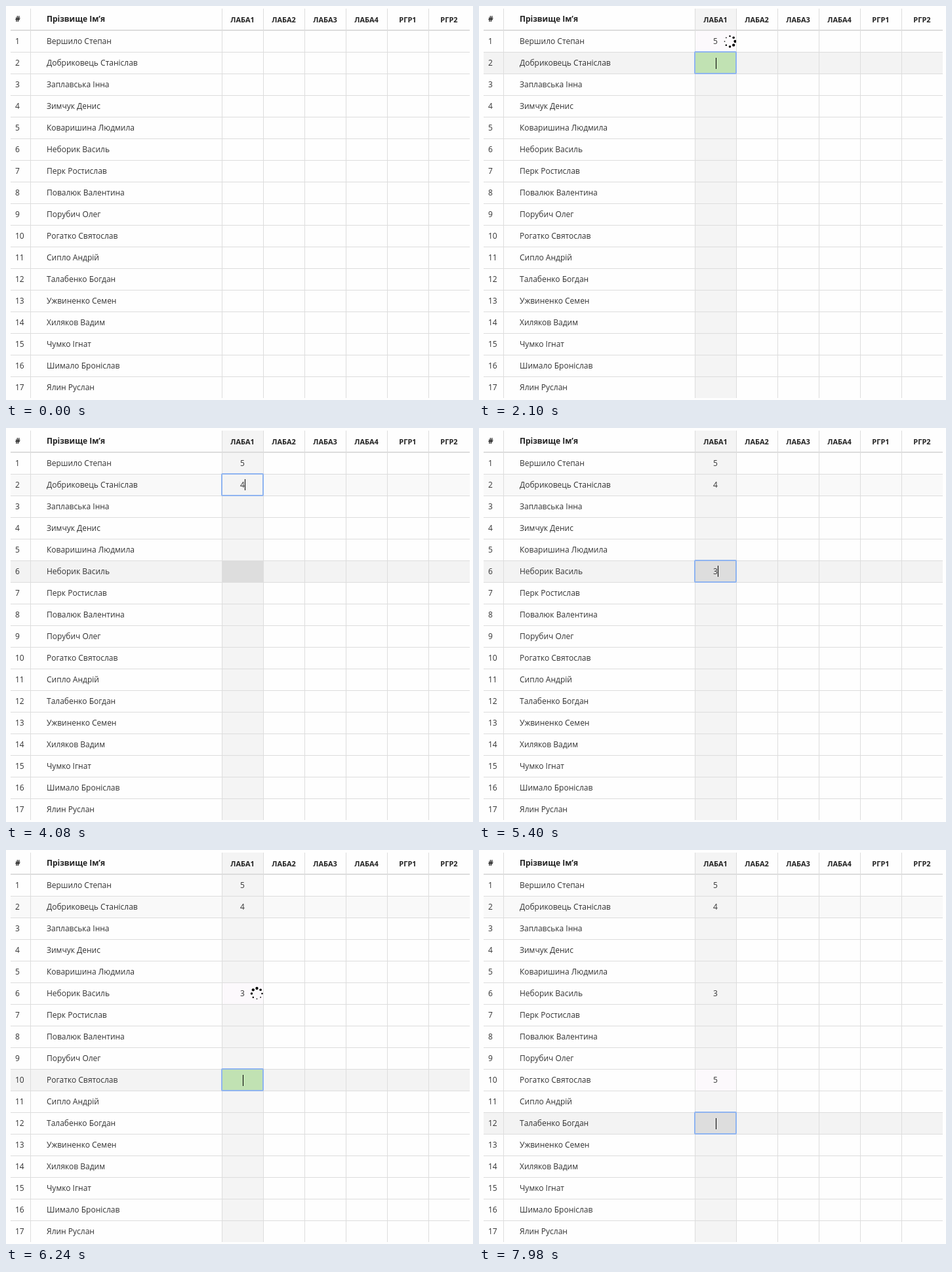
Recreate the animation shown at these times as an HTML page with a canvas. Size 712 by 601 pixels, loop 8000 ms.

```html
<!DOCTYPE html>
<html lang="uk">
<head>
<meta charset="utf-8">
<style>
  html, body { margin: 0; width: 100%; height: 100%; overflow: hidden; background: #fefefe; }
  canvas { display: block; }
</style>
</head>
<body>
<canvas id="stage" width="712" height="601"></canvas>
<script>
const ctx = document.getElementById('stage').getContext('2d');
const LOOP = 8000, TICK = 60, BLINK = 500, ROW_TIME = 125;
const ROW = 33, FIRST = 38, COL = 330, COL_W = 62, MID = 360.5;

const students = [
  'Вершило Степан', 'Добриковець Станіслав', 'Заплавська Інна', 'Зимчук Денис',
  'Коваришина Людмила', 'Неборик Василь', 'Перк Ростислав', 'Повалюк Валентина',
  'Порубич Олег', 'Рогатко Святослав', 'Сипло Андрій', 'Талабенко Богдан',
  'Ужвиненко Семен', 'Хиляков Вадим', 'Чумко Ігнат', 'Шимало Броніслав', 'Ялин Руслан'
];
const works = ['ЛАБА1', 'ЛАБА2', 'ЛАБА3', 'ЛАБА4', 'РГР1', 'РГР2'];

// Each visit: the pointer moves to a row, clicks its cell, then a mark is typed.
// A click also saves the previous mark; busy is how long that takes.
const visits = [
  { row: 1, move: 240, click: 540, busy: 120, typed: 1200, mark: '5' },
  { row: 2, move: 1620, click: 1980, busy: 300, typed: 3060, mark: '4' },
  { row: 6, move: 3360, click: 4500, busy: 60, typed: 5400, mark: '3' },
  { row: 10, move: 5580, click: 6240, busy: 240, typed: 7140, mark: '5' },
  { row: 12, move: 7320, click: 7920, busy: 60, typed: Infinity }
];

const rowTop = row => FIRST + (row - 1) * ROW;
const latest = (key, t) => visits.findLast(v => t >= v[key]);
const isBusy = (visit, t, extra = 0) => visit && t >= visit.click && t < visit.click + visit.busy + extra;

function hoveredRow(t) {
  const visit = latest('move', t);
  if (!visit) return 0;
  const previous = visits[visits.indexOf(visit) - 1];
  const start = previous ? previous.row + 1 : visit.row;
  const rows = visit.row - start;
  const progress = Math.min(1, (t - visit.move) / (rows * ROW_TIME || 1));
  return start + Math.floor(rows * Math.sin(progress * Math.PI / 2));
}

function box(x, y, w, h, color) {
  ctx.fillStyle = color;
  ctx.fillRect(x, y, w, h);
}

function text(str, x, y, { size = 12, bold = false, align = 'left' } = {}) {
  ctx.font = `${bold ? 'bold ' : ''}${size}px "Open Sans", sans-serif`;
  ctx.textAlign = align;
  ctx.fillStyle = bold ? '#222' : '#333';
  ctx.fillText(str, x, y);
}

function spinner(cx, cy, t) {
  const head = 0.4 + (Math.floor(t / TICK) - 35) * Math.PI / 4;
  ctx.fillStyle = '#000';
  for (let i = 0; i < 8; i++) {
    const a = i * Math.PI / 4;
    ctx.beginPath();
    ctx.arc(cx + 8 * Math.cos(a), cy + 8 * Math.sin(a), 1.5 + 0.7 * Math.cos(a - head), 0, 7);
    ctx.fill();
  }
}

function drawGrid() {
  box(7, 36, 700, 2, '#ddd');
  for (let row = 2; row <= students.length; row++) box(7, rowTop(row) - 1, 700, 1, '#ddd');
  box(37, 4, 1, 594, '#ddd');
  works.forEach((_, i) => box(329 + i * 63, 4, 1, 594, '#ddd'));
}

function drawLabels() {
  text('#', 14, 24, { bold: true });
  text('Прізвище Ім’я', 62, 24, { bold: true });
  works.forEach((work, i) => text(work, MID + i * 63, 25, { size: 11, bold: true, align: 'center' }));
  students.forEach((name, i) => {
    const y = rowTop(i + 1) + 20;
    text(i + 1, 14, y);
    text(name, 62, y);
  });
}

function drawHover(t, focus) {
  const row = hoveredRow(t);
  if (!row) return;
  box(7, rowTop(row), 700, 32, '#f3f3f3');
  box(COL, 4, COL_W, 594, '#f4f4f4');
  const green = focus && focus.row === row && isBusy(focus, t);
  box(COL, rowTop(row), COL_W, 32, green ? '#c1e2b3' : '#ddd');
}

function drawMark(visit, i, t) {
  const y = rowTop(visit.row), next = visits[i + 1];
  if (isBusy(next, t, TICK)) box(COL, y, COL_W, 32, '#fcf9fc');
  if (t >= visit.typed) text(visit.mark, MID, y + 20, { align: 'center' });
  if (isBusy(next, t)) spinner(382.5, y + 16, t);
}

function drawFocus(visit, t) {
  const y = rowTop(visit.row), filled = t >= visit.typed;
  ctx.strokeStyle = '#8fb4f0';
  ctx.lineWidth = 2;
  ctx.beginPath();
  ctx.roundRect(329, y - 1, 63, 33, 1);
  ctx.stroke();
  const sinceInput = t - (filled ? visit.typed : visit.click);
  if (sinceInput % (2 * BLINK) < BLINK) box(filled ? 364 : 361, y + (filled ? 7 : 8), 1, 17, '#000');
}

function draw(t) {
  const focus = latest('click', t);
  box(0, 0, 712, 601, '#fefefe');
  if (t >= visits[2].move) box(7, rowTop(2), 700, 32, '#f9f9f9');
  drawHover(t, focus);
  visits.forEach((visit, i) => drawMark(visit, i, t));
  drawGrid();
  drawLabels();
  if (focus) drawFocus(focus, t);
}

function frame() {
  draw(performance.now() % LOOP);
  requestAnimationFrame(frame);
}
frame();
</script>
</body>
</html>
```
